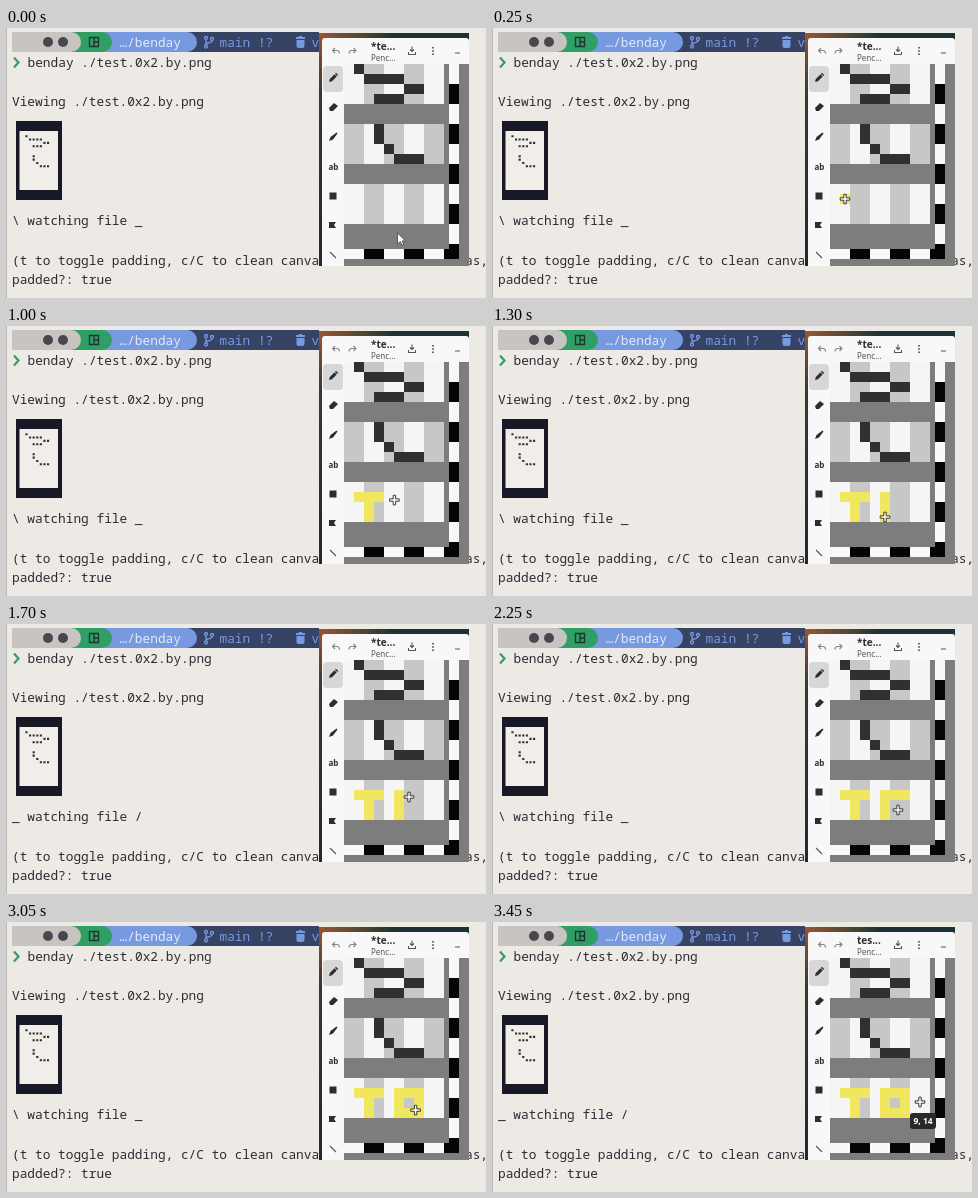
Recreate the animation shown at these times as an HTML page. Size 480x270 px, loop 3500 ms.

```html
<!DOCTYPE html>
<html lang="en">
<head>
<meta charset="utf-8">
<title>Terminal preview and pixel editor</title>
<style>
  html, body { margin: 0; width: 100%; height: 100%; overflow: hidden; background: #ece8e3; }
  svg { display: block; width: 480px; height: 270px; }
  .mono { font: 12.8px "Noto Sans Mono", "DejaVu Sans Mono", monospace; fill: #2c2b35; white-space: pre; }
  .ui { font-family: "Noto Sans", "Open Sans", sans-serif; fill: #2d2d2d; }
  .line { fill: none; stroke: #555; stroke-width: 1.1; }
  .icon { fill: #2d2d2d; }
</style>
</head>
<body>
<svg viewBox="0 0 480 270">
  <defs>
    <linearGradient id="leaves">
      <stop stop-color="#9a5632"/><stop offset=".3" stop-color="#4d4633"/><stop offset=".5" stop-color="#1d3235"/>
    </linearGradient>
    <linearGradient id="edge" x2="0" y2="1">
      <stop stop-color="#9a5632"/><stop offset=".25" stop-color="#353a38"/><stop offset="1" stop-color="#20292c"/>
    </linearGradient>
    <!-- dark pixels, one unit per cell -->
    <path id="pixels" d="M1 .5h1M2 1.5h4M6 2.5h2M3 3.5h3M3 6.5h1M3 7.5h1M4 8.5h1M5 9.5h3" fill="none" stroke="#303030"/>
  </defs>
  <rect width="480" height="270" fill="#ede9e4"/>
  <rect width="1" height="270" fill="#bdb9b5"/>

  <!-- prompt bar -->
  <rect x="6" y="4" width="307" height="20" fill="#364364"/>
  <path d="M90 4h91a10 10 0 0 1 0 20H90z" fill="#7799e0"/>
  <path d="M60 4h36a10 10 0 0 1 0 20H60z" fill="#2f9f65"/>
  <path d="M6 4h59a10 10 0 0 1 0 20H6z" fill="#c8c4c2"/>
  <circle cx="42" cy="14" r="5" fill="#484750"/>
  <circle cx="57" cy="14" r="5" fill="#484750"/>
  <path d="M83.5 9.5h9v9h-9zM88 9.5v9M88 14h4.500" fill="none" stroke="#1d3430" stroke-width="1.3"/>
  <text class="mono" x="113.5" y="18.5" style="fill:#e4eaf8">…/benday</text>
  <g fill="none" stroke="#7799e0" stroke-width="1.3">
    <circle cx="200" cy="10" r="1.5"/><circle cx="200" cy="18.5" r="1.5"/><circle cx="206" cy="11" r="1.5"/>
    <path d="M200 11.5V17M206 12.5q0 2-6 3"/>
  </g>
  <text class="mono" x="213.5" y="18.5" style="fill:#7799e0">main !?</text>
  <path d="M290 9h9v2h-9zM293 8h3v2h-3zM290.500 12h8v6q0 2-2 2h-4q-2 0-2-2z" fill="#7799e0"/>
  <text class="mono" x="305.5" y="18.5" style="fill:#7799e0">v</text>

  <!-- terminal -->
  <path d="M8 29.5l4.500 5-4.500 5" fill="none" stroke="#2f9f65" stroke-width="2.2"/>
  <text class="mono" x="21.5" y="38.5">benday ./test.0x2.by.png</text>
  <text class="mono" x="6" y="78">Viewing ./test.0x2.by.png</text>
  <rect x="10" y="93" width="46" height="79" fill="#191827"/>
  <rect x="13.5" y="103" width="38.5" height="59" fill="#f1eeea"/>
  <use href="#pixels" transform="translate(15.8 106.5) scale(3.6 3.35)" stroke-width=".6" stroke-dasharray=".6 .4"/>
  <text class="mono" id="status" x="6" y="197"></text>
  <text class="mono" x="6" y="236.5">(t to toggle padding, c/C to clean canva</text>
  <text class="mono" x="459" y="236.5">as,</text>
  <text class="mono" x="6" y="256">padded?: true</text>

  <!-- editor window -->
  <rect x="313" y="5" width="150" height="12" fill="url(#leaves)"/>
  <rect x="313" y="5" width="4" height="233" fill="url(#edge)"/>
  <path d="M316 238V13q0-3 3-3h141q3 0 3 3V238z" fill="#f8f8f8"/>
  <g id="canvas"></g>
  <use href="#pixels" transform="translate(338 36) scale(10)"/>
  <g id="ink" fill="#f1e75e"></g>

  <g class="line" style="stroke:#858585">
    <path d="M329 20l-2.500 2.500 2.500 2.500M327 22.500h4q2.500 0 2.500 3"/>
    <path d="M347.500 20l2.500 2.500-2.500 2.500M349.500 22.500h-4q-2.500 0-2.500 3"/>
  </g>
  <text class="ui" id="title" x="365" y="22" font-size="10" font-weight="700"></text>
  <text class="ui" x="365" y="33" font-size="8" style="fill:#555">Penc...</text>
  <path class="line" d="M406 18.500v5M404 21.500l2 2 2-2M402.500 24v2.500h7v-2.500M449 25h5"/>
  <path d="M427 19v8" fill="none" stroke="#444" stroke-width="1.6" stroke-dasharray="1.6"/>

  <rect x="317" y="38" width="20" height="26" rx="4" fill="#d7d7d7"/>
  <g class="icon">
    <path d="M323 54l.8-3 4.700-4.700 2.200 2.200-4.700 4.700zM329 45.800l1-1 2.200 2.200-1 1z"/>
    <path d="M323 80l5-5 4 3-5 5h-3z"/>
    <path d="M323 113l1.500-4 6-4.500 1 1-4.500 6z"/>
    <path d="M323.500 164.500h7v7h-7z"/>
    <path d="M323 194h7l-2 3 2 3h-7z"/>
  </g>
  <text class="ui" x="322.5" y="141.5" font-size="8" font-weight="700">ab</text>
  <path class="line" d="M324 224l6 6"/>

  <g id="tip">
    <rect x="418" y="191" width="26" height="16" rx="3" fill="#292929"/>
    <text class="ui" x="431" y="202" font-size="8.5" font-weight="600" text-anchor="middle" style="fill:#fff">9, 14</text>
  </g>
  <path id="arrow" d="M-2.500-6v11l2.800-2.400 1.700 3.600 1.800-.8-1.700-3.500h3.400z" fill="#fff" stroke="#444" stroke-width=".8"/>
  <path id="cross" d="M-1.200-4.800h2.400v3.600h3.600v2.400h-3.600v3.600h-2.400v-3.600h-3.600v-2.400h3.600z" fill="#fafafa" stroke="#3a3a3a"/>
</svg>
<script>
const LOOP = 3500, CELL = 10, PACE = 100;
const $ = id => document.getElementById(id);

function rect(parent, x, y, w, h, fill) {
  const r = document.createElementNS('http://www.w3.org/2000/svg', 'rect');
  const attrs = { x, y, width: w, height: h };
  if (fill) attrs.fill = fill;
  for (const k in attrs) r.setAttribute(k, attrs[k]);
  return parent.appendChild(r);
}

// Checkered blocks between grey bars, with a ruler along two sides
const canvas = $('canvas');
rect(canvas, 338, 36, 125, 202, '#7d7d7d');
for (let row = 0; row < 3; row++)
  for (let col = 0; col < 5; col++)
    rect(canvas, 338 + col * 20, 36 + row * 60, 20, 40, (row % 2 + col) % 2 ? '#c7c7c7' : '#f5f5f5');
const ruler = i => i % 2 ? '#050505' : '#f8f8f8';
for (let i = 0; i < 10; i++) rect(canvas, 443, 36 + i * 20, 10, i < 9 ? 20 : 15, ruler(i));
for (let i = 0; i < 5; i++) rect(canvas, 338 + i * 20, 221, 20, 10, ruler(i));
rect(canvas, 438, 221, 15, 10, ruler(1));

// Pen lines paint one cell per PACE; the pointer eases from line to line
const stops = [], cells = [];
const rest = (at, col, row) => stops.push({ at, x: 353 + col * CELL, y: 171 + row * CELL });
function line(at, col, row, count, dx, dy) {
  for (let i = 0; i < count; i++) {
    const c = col + i * dx, r = row + i * dy, time = at + i * PACE;
    cells.push({ at: time, el: rect($('ink'), 348 + c * CELL, 166 + r * CELL, CELL, CELL) });
    rest(time, c, r);
  }
}
rest(0, 4.1, 4);
line(250, 0, 0, 3, 1, 0);
line(600, 1, 1, 2, 0, 1);
line(1100, 4, 0, 3, 0, 1);
rest(1700, 5, 0.2);
line(1800, 5, 0, 2, 1, 0);
rest(2250, 5.3, 1.5);
line(2350, 6, 1, 2, 0, 1);
rest(2700, 7.3, 1.8);
line(2950, 5, 2, 1, 0, 0);
rest(3250, 7.5, 0.9);
rest(LOOP, 7.5, 0.9);

function pointer(t) {
  const i = stops.findIndex(s => s.at > t), a = stops[i - 1], b = stops[i];
  const u = (t - a.at) / (b.at - a.at), k = u * u * (3 - 2 * u);
  return `translate(${a.x + (b.x - a.x) * k} ${a.y + (b.y - a.y) * k})`;
}

const show = (el, on) => el.setAttribute('visibility', on ? 'visible' : 'hidden');

function draw(t) {
  for (const id of ['arrow', 'cross']) $(id).setAttribute('transform', pointer(t));
  show($('arrow'), t < 100);
  show($('cross'), t >= 100);
  show($('tip'), t >= 3250);
  for (const c of cells) show(c.el, t >= c.at);
  $('status').textContent = t % 250 < 125 ? '\\ watching file _' : '_ watching file /';
  $('title').textContent = t < 3400 ? '*te...' : 'tes...';
}

const start = performance.now();
function tick() {
  draw((performance.now() - start) % LOOP);
  requestAnimationFrame(tick);
}
tick();
</script>
</body>
</html>
```
